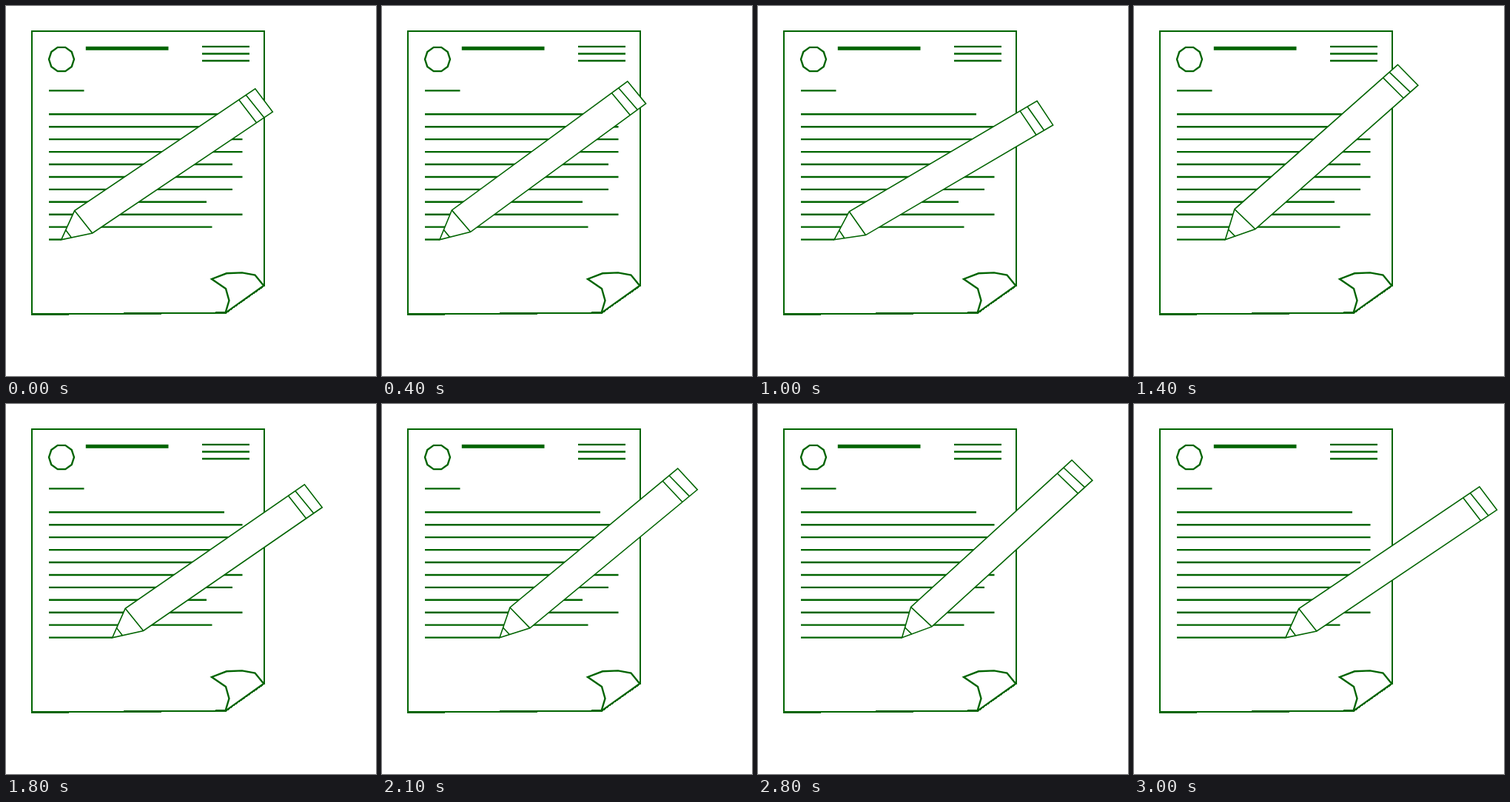
Recreate the animation shown at these times as an HTML page. Size 500 px wide and 500 px high, loop 3100 ms.

```html
<!DOCTYPE html>
<html>
<head>
<meta charset="utf-8">
<title>Writing a letter</title>
<style>
html, body { margin: 0; width: 100%; height: 100%; overflow: hidden; background: #fff; }
svg { display: block; width: 100%; height: 100%; fill: #fff; stroke: #006400; stroke-width: 2.4; }
#paper { shape-rendering: crispEdges; }
#pencil { stroke-width: 1.6; }
</style>
</head>
<body>
<svg viewBox="0 0 500 500">
  <g id="paper">
    <path d="M35 34H349V377L297 414.6L35 416.7Z"/>
    <path d="M297 413.8L348.8 377.2" stroke-width="3.4"/>
  </g>
  <path d="M297 413L301.5 398L297 382L278 369L298 361.3L319 360.4L336.5 363.5L347.5 377"/>
  <path id="seal"/>
  <path d="M107.8 57.3H219.5" stroke-width="5"/>
  <path d="M265 54.9H329M265 64.5H329M265 74H329M58 114.4H105.5"/>
  <path id="text"/>
  <path id="ink"/>
  <g id="pencil">
    <path d="M0 0L36.8 -22.5L331.3 -22.5L333.4 16.5L39.8 16.2Z"/>
    <path d="M36.8 -22.5L39.8 16.2M12.3 -7.5L13 5.6M304.7 -22.5L307.1 16.5M316.2 -22.5L319.4 16.5"/>
  </g>
</svg>
<script>
const el = id => document.getElementById(id);
const LOOP = 3100, HOLD = 300, STEP = 100;

// The pencil rocks steadily between these turning points: step, degrees
const turns = [
  [0, 34], [4, 43], [7.5, 28.4], [10.4, 43.8], [14, 30.2],
  [17, 43.6], [20.7, 29], [24, 46.6], [27, 34]
];

function tilt(step) {
  const i = Math.max(1, turns.findIndex(p => p[0] >= step));
  const [s0, a0] = turns[i - 1], [s1, a1] = turns[i];
  return a0 + (a1 - a0) * (step - s0) / (s1 - s0);
}

// The tip starts slowly, then moves at an even pace
const tipX = step => 74.7 + 3.25 * Math.min(step, 4) + 5.09 * Math.max(0, step - 4);

const corners = Array.from({ length: 10 }, (_, i) => {
  const a = i * Math.PI / 5;
  return `${75 + 17 * Math.cos(a)} ${72 + 17 * Math.sin(a)}`;
});
el('seal').setAttribute('d', `M${corners.join('L')}Z`);

const ends = [295, 319.5, 319.5, 319.5, 306, 319.5, 306, 271, 319.5, 278.5];
el('text').setAttribute('d', ends.map((x, i) => `M58 ${146.3 + i * 16.93}H${x}`).join(''));

function draw(now) {
  const step = Math.max(0, Math.floor((now % LOOP - HOLD) / STEP));
  const x = tipX(step);
  el('pencil').setAttribute('transform', `translate(${x} 315.8) rotate(${-tilt(step)})`);
  el('ink').setAttribute('d', `M58 315.6H${x}`);
}

const start = performance.now();
function tick() {
  draw(performance.now() - start);
  requestAnimationFrame(tick);
}
tick();
</script>
</body>
</html>
```
